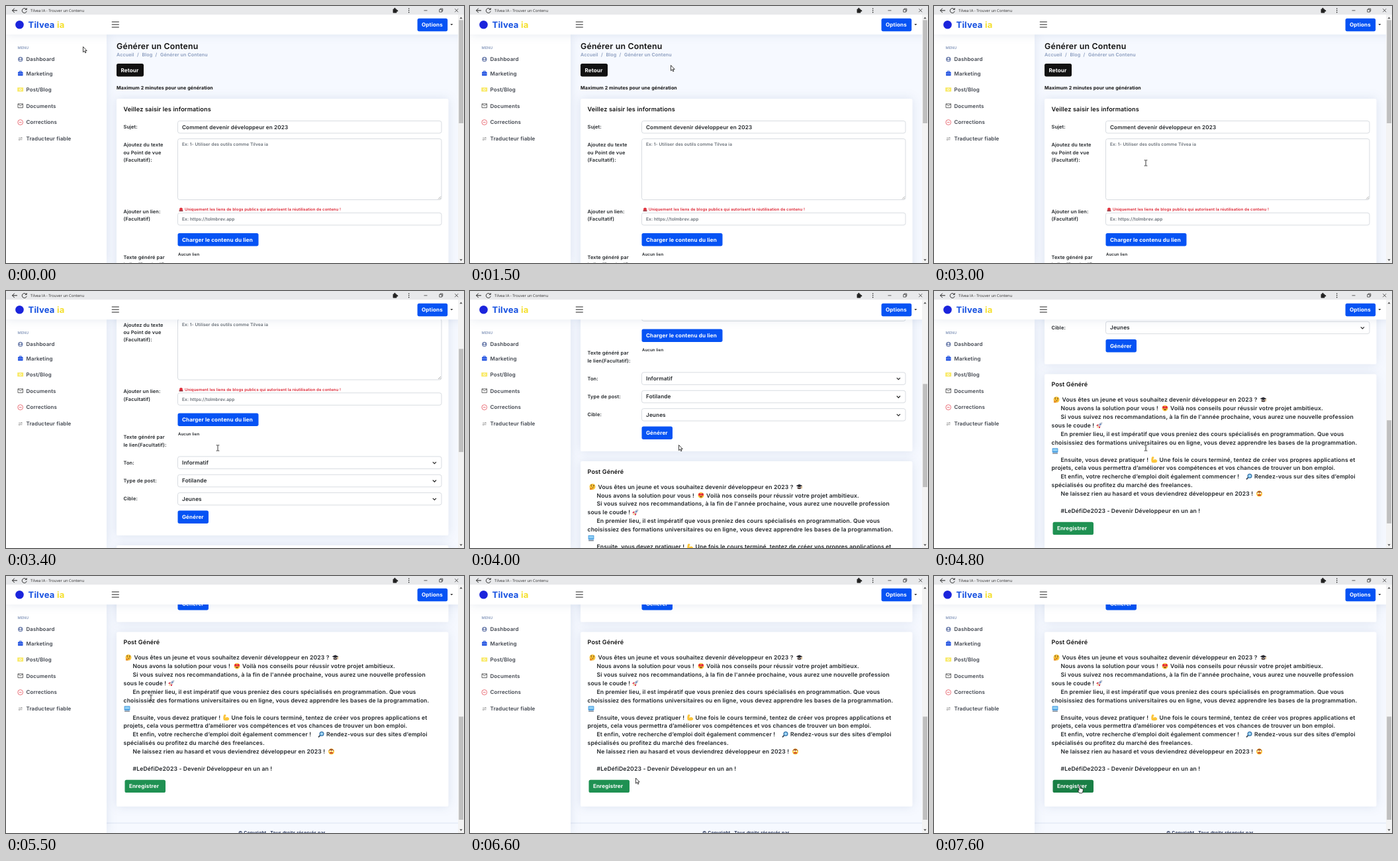
Write an HTML page that moves like this. It is 692 px wide and 388 px high and loops after 8 s.

```html
<!DOCTYPE html>
<html lang="fr">
<head>
<meta charset="utf-8">
<title>Trouver un Contenu</title>
<style>
  html, body { margin: 0; width: 100%; height: 100%; overflow: hidden; background: #f6f9ff; }
  svg { display: block; width: 692px; height: 388px; }
  text { font-family: Inter, "Open Sans", sans-serif; font-weight: 600; letter-spacing: .016em;
         text-rendering: geometricPrecision; white-space: pre; }
  .bold { font-weight: 700; }
  .system { font-family: "Open Sans", sans-serif; font-weight: 400; letter-spacing: 0; }
  .panel { fill: #fff; filter: drop-shadow(0 0 7.8px rgba(1, 41, 112, .1)); }
  .field { fill: #fff; stroke: #ced4da; stroke-width: .8; }
  .line { fill: none; stroke: #222; }
  .cursor { fill: #fff; stroke: #111; stroke-width: .8; stroke-linejoin: round; }
</style>
</head>
<body>
<svg id="stage" viewBox="0 0 692 388"></svg>
<script>
const INK = '#212529', BLUE = '#0653f4', GREEN = '#1f9152', DARK_GREEN = '#197f45', MUTED = '#899bbd', HINT = '#666d75';

// y is the vertical middle of the capitals
const text = (x, y, s, size, fill = INK, cls = '') =>
  `<text x="${x}" y="${y + size * .36}" font-size="${size}" fill="${fill}" class="${cls}">${s}</text>`;
const box = (x, y, w, h, fill, r = 0, extra = '') =>
  `<rect x="${x}" y="${y}" width="${w}" height="${h}" fill="${fill}" rx="${r}" ${extra}/>`;
const path = (d, width = 1, color = '#222') =>
  `<path class="line" d="${d}" stroke-width="${width}" style="stroke:${color}"/>`;
const shape = (d, fill) => `<path d="${d}" fill="${fill}"/>`;
const dot = (x, y, r, fill) => `<circle cx="${x}" cy="${y}" r="${r}" fill="${fill}"/>`;
const ring = (x, y, r, color, width, fill = 'none') =>
  `<circle cx="${x}" cy="${y}" r="${r}" fill="${fill}" stroke="${color}" stroke-width="${width}"/>`;
const button = (x, y, w, label, fill = BLUE, id = '') =>
  box(x, y, w, 19.4, fill, 2.6, id && `id="${id}"`) + text(x + 6.4, y + 9.6, label, 8.1, '#fff', 'bold');
const field = (y, h = 18.5) => box(259.5, y, 398.5, h, '#fff', 3, 'class="field"');
const select = (y, label, value) => text(177.5, y, label, 7.4) + field(y - 9.2) +
  text(266, y, value, 8.2) + path(`M644.8 ${y - 1}l2.6 2.6 2.6-2.6`, 1.1);
const labels = (y, ...lines) => lines.map((s, i) => text(177.5, y + i * 11.4, s, 7.4)).join('');

const face = dot(0, 0, 4.5, '#fbc53a');
const icons = {
  think: face + path('M-2.8-2.4l2-.6M1-2.2h2M-.5 1.6l2.2-.5', .8, '#5b3a16') + dot(-1.6, -.9, .7, '#5b3a16') +
    dot(1.8, -.9, .7, '#5b3a16') + shape('M-4 4.6q-.6-3 1.5-3.4l2 .8 1 1.2-2 1.6z', '#e8912a'),
  cap: shape('M-4.8-1.4L0-3.8l4.8 2.4L0 1z', '#2b2b33') + shape('M-2.8.4L0 1.8 2.8.4v2.4q-2.8 1.6-5.6 0z', '#45332f') +
    path('M3.8-1v3.6', .8, '#c98f2c'),
  love: face + dot(-2, -1.2, 1.9, '#e5233f') + dot(2, -1.2, 1.9, '#e5233f') + shape('M-2.4 1.4h4.8q-2.4 3.6-4.8 0z', '#6b2f15'),
  rocket: shape('M4.4-4.4q-4 0-6.4 4.4l2 2q4.4-2.4 4.4-6.4z', '#b9c3cf') +
    shape('M-1.4-1.4l-2.6.6-.6 2 2.6-.4zM1.4 1.4l-.6 2.6-2 .6.4-2.6z', '#d8304a') +
    shape('M-2 .8l-2.2 3.4 3.2-2z', '#f2a53a') + dot(1.4, -1.4, .9, '#3f6fc4'),
  screen: box(-4.4, -4.2, 8.8, 6.6, '#4d9fe0', .8) + box(-3.4, -3.2, 6.8, 3.6, '#8fd0f5') + box(-4, 3, 8, 1.5, '#7d8a99', .4),
  arm: shape('M-3.6-4.2h2.6l.6 2-1.2.6.2 2.4q3-2.6 5.4.4 1 2-1 3-4 1.2-7 .2-1.6-4 .4-8.6z', '#fbc53a'),
  lens: path('M-1.2 1.2l-2.8 2.8', 1.8, '#3b4654') + ring(1, -1, 2.9, '#2f70a8', 1.2, '#9fd6f7'),
  grin: face + shape('M-4.2-1.4q4.2-6 8.4 0z', '#a55a2a') + dot(-1.7, -.7, 1.1, '#fff') + dot(1.7, -.7, 1.1, '#fff') +
    box(-2.4, 1.2, 4.8, 1.8, '#c5302c', .9),
  siren: shape('M-2.4 1.4v-2q0-2 2.4-2t2.4 2v2z', '#e0303c') + box(-3, 1.4, 6, 1.5, '#8f2530', .3)
};
const icon = (name, x, y) => `<g transform="translate(${x} ${y})">${icons[name]}</g>`;

// row, then x and content pairs; a leading ":" names an icon
const post = [
  [0, 185, ':think', 193.5, 'Vous êtes un jeune et vous souhaitez devenir développeur en 2023 ?', 497.5, ':cap'],
  [1, 191.5, 'Nous avons la solution pour vous !', 349, ':love', 357, 'Voilà nos conseils pour réussir votre projet ambitieux.'],
  [2, 191.5, "Si vous suivez nos recommandations, à la fin de l'année prochaine, vous aurez une nouvelle profession"],
  [3, 177.5, 'sous le coude !', 250, ':rocket'],
  [4, 191.5, 'En premier lieu, il est impératif que vous preniez des cours spécialisés en programmation. Que vous'],
  [5, 177.5, 'choisissiez des formations universitaires ou en ligne, vous devez apprendre les bases de la programmation.'],
  [6, 183, ':screen'],
  [7, 191.5, 'Ensuite, vous devez pratiquer !', 333, ':arm', 340.5, 'Une fois le cours terminé, tentez de créer vos propres applications et'],
  [8, 177.5, 'projets, cela vous permettra d’améliorer vos compétences et vos chances de trouver un bon emploi.'],
  [9, 191.5, 'Et enfin, votre recherche d’emploi doit également commencer !', 476, ':lens', 484, 'Rendez-vous sur des sites d’emploi'],
  [10, 177.5, 'spécialisés ou profitez du marché des freelances.'],
  [11, 191.5, 'Ne laissez rien au hasard et vous deviendrez développeur en 2023 !', 491.5, ':grin'],
  [13, 191.5, '#LeDéfiDe2023 - Devenir Développeur en un an !']
];
const postRow = ([row, ...parts]) => {
  const y = 581 + row * 12.92;
  let out = '';
  for (let i = 0; i < parts.length; i += 2) {
    const [x, s] = [parts[i], parts[i + 1]];
    out += s[0] === ':' ? icon(s.slice(1), x, y) : text(x, y, s, 8.65);
  }
  return out;
};

const page =
  text(167, 60.5, 'Générer un Contenu', 12.3, '#111') +
  [[167, 'Accueil'], [198, '/'], [205.5, 'Blog'], [225.5, '/'], [233, 'Générer un Contenu']]
    .map(([x, s]) => text(x, 73.5, s, 7.15, MUTED)).join('') +
  button(167, 87, 41, 'Retour', '#111') +
  text(167, 123, 'Maximum 2 minutes pour une génération', 7.1, '#111', 'bold') +
  box(167, 140, 501.5, 387.5, '#fff', 2.6, 'class="panel"') +
  text(177.5, 156, 'Veillez saisir les informations', 9.1, '#111') +
  labels(182, 'Sujet:') + field(173.5) + text(266, 182.7, 'Comment devenir développeur en 2023', 8.15) +
  labels(209.5, 'Ajoutez du texte', 'ou Point de vue', '(Facultatif):') + field(200.5, 92) +
  text(266, 209, 'Ex: 1- Utiliser des outils comme Tilvea ia', 6.5, HINT) +
  path('M653 291.5l4-4M655.3 291.5l1.7-1.7', .6, '#777') +
  labels(310, 'Ajouter un lien:', '(Facultatif)') + icon('siren', 264.5, 307) +
  text(270, 307, 'Uniquement les liens de blogs publics qui autorisent la réutilisation de contenu !', 5.95, '#dc1f2e') +
  field(312.3) + text(266, 322, 'Ex: https://tolmbrev.app', 6.6, HINT) +
  button(259.5, 343, 122, 'Charger le contenu du lien') +
  labels(379, 'Texte généré par', 'le lien(Facultatif):') + text(260, 374.7, 'Aucun lien', 6.1) +
  select(417.6, 'Ton:', 'Informatif') + select(445, 'Type de post:', 'Fotilande') + select(472.3, 'Cible:', 'Jeunes') +
  button(259.5, 490, 46.5, 'Générer') +
  box(167, 542.5, 501.5, 263.5, '#fff', 2.6, 'class="panel"') +
  text(177.5, 558, 'Post Généré', 9, '#111') + post.map(postRow).join('') +
  button(179.5, 765.7, 61.5, 'Enregistrer', GREEN, 'save') +
  path('M152 831h532', .8, '#d5deef') +
  text(351, 846, '© Copyright . Tous droits réservés par', 6.9, '#16244a');

const menu = [[80.5, 'Dashboard'], [101.7, 'Marketing'], [126, 'Post/Blog'], [150.7, 'Documents'],
  [175.5, 'Corrections'], [200.5, 'Traducteur fiable']].map(([y, s]) => text(30.5, y, s, 7.95, '#41464f')).join('');

const sidebar = box(0, 43, 152, 345, '#fff', 0, 'class="panel"') + text(17.5, 63, 'MENU', 5.5, MUTED) + menu +
  dot(21.8, 80.5, 3.7, '#7484b0') + dot(21.8, 79.5, 1.3, '#fff') + shape('M19.4 83q2.4-3 4.8 0z', '#fff') +
  box(18, 99.6, 7.6, 5.6, '#1d4fe0', .8) + path('M20.3 99.6v-1.3h3v1.3', .9, '#1d4fe0') + path('M18 102.4h7.6', .5, '#fff') +
  box(17.2, 123, 9, 6.2, '#f9ea6a', .6) + ring(21.7, 126.1, 1.5, '#fff', .8) +
  path('M18 147.8h7.5v5.8h-7.5zl3.75 3 3.75-3', .8, '#444') +
  ring(21.7, 175.6, 3.9, '#e5505a', .8) + path('M19.7 175.6h4', .8, '#e5505a') +
  path('M19 199.3h5.5l-1.5-1.3M24.5 201.7h-5.5l1.5 1.3', .7, '#777');

const header = box(0, 13, 692, 30, '#fff', 0, 'class="panel"') + dot(20.5, 28.2, 6.3, '#1b24dc') +
  text(33.5, 28.3, 'Tilvea', 13, '#1550e0', 'bold') + text(77, 28.3, 'ia', 13, '#f4df2c', 'bold') +
  path('M159.8 24h11M159.8 28h11M159.8 32h11', 1.2) +
  button(621.6, 18.8, 45.6, 'Options') + shape('M671.3 27h4l-2 2.3z', '#333');

const titleBar = box(0, 0, 692, 13, '#e8e9eb') +
  path('M17 6.8H9.5M12.8 3.5L9.5 6.8l3.3 3.3') +
  path('M30.8 5.2a3.5 3.5 0 1 0 .4 2.6M31.2 3v2.4h-2.4', .9) +
  text(37, 6.8, 'Tilvea IA - Trouver un Contenu', 5.8, '#333', 'system') +
  box(584.6, 4.4, 5.8, 6, '#222', .7) + dot(587.4, 4, 1.2, '#222') + dot(591, 7.3, 1.2, '#222') +
  [4, 6.8, 9.6].map(y => dot(608.7, y, .8, '#222')).join('') +
  path('M631.5 6.8h5M654.8 5.3h3.8v3.8h-3.8zM656 5.2V4h3.8v3.8h-1.2M678.2 4.2l5 5M683.2 4.2l-5 5', .7);

const scrollbar = box(683, 13, 9, 375, '#f3f3f3') + shape('M685.4 19.2h4.2l-2.1-2.6z', '#555') +
  shape('M685.4 382.3h4.2l-2.1 2.6z', '#555') + box(684.2, 21.3, 6.8, 155.7, '#bfbfbf', 0, 'id="thumb"');

const cursors =
  '<path id="arrow" class="cursor" d="M-4.5-4.5v8.2l1.9-1.7 1.3 2.8 1.3-.6-1.3-2.7h2.5z"/>' +
  '<path id="beam" class="line" d="M-2.3-4.2h1.6l.7.6.7-.6h1.6M0-3.6v7.2M-2.3 4.2h1.6l.7-.6.7.6h1.6" stroke-width=".9"/>' +
  '<path id="hand" class="cursor" d="M-2 1V-5.2a1 1 0 0 1 2 0v3.7l3.5.8q1 .3.9 1.5l-.6 3.2-1 1.8h-4l-2.8-4q.6-1.2 2 .2z"/>';

document.getElementById('stage').innerHTML =
  box(0, 0, 692, 388, '#f6f9ff') + `<g id="page">${page}</g>` + sidebar + header + titleBar + scrollbar + cursors;

const scrollKeys = [[0, 0], [3000, 0], [3400, 158.5], [4000, 285.5], [4800, 417], [5200, 458]];
const pointerKeys = [
  [0, 121, 66, 'arrow'], [300, 380, 347, 'arrow'], [600, 578, 177, 'beam'], [700, 578, 177, 'beam'],
  [1100, 619.5, 216, 'beam'], [1400, 619.5, 216, 'beam'], [1500, 308, 94, 'arrow'], [1700, 308, 94, 'arrow'],
  [2300, 24, 176, 'arrow'], [2500, 24, 176, 'arrow'], [2800, 220, 218, 'arrow'], [3000, 320, 237, 'beam'],
  [3800, 320, 237, 'arrow'], [4300, 320, 237, 'beam'], [5200, 320, 237, 'beam'], [5500, 219, 184, 'beam'],
  [6100, 340, 247, 'arrow'], [6700, 238, 322, 'hand'], [6800, 235, 326, 'hand'], [7000, 235, 326, 'hand'],
  [7300, 217, 323, 'hand'], [7600, 221, 322, 'hand']
];

// current key with its numbers moved linearly towards the next one
function sample(keys, t) {
  const i = keys.findLastIndex(key => key[0] <= t);
  const from = keys[i], to = keys[i + 1] || from;
  const k = to === from ? 0 : (t - from[0]) / (to[0] - from[0]);
  return from.map((v, n) => typeof v === 'number' ? v + (to[n] - v) * k : v);
}

const el = id => document.getElementById(id);
const move = (id, x, y) => el(id).setAttribute('transform', `translate(${x} ${y})`);

function draw(now) {
  const t = Math.floor(now % 8000 / 100) * 100;
  const scroll = sample(scrollKeys, t)[1];
  const [, x, y, kind] = sample(pointerKeys, t);
  move('page', 0, -scroll);
  move('thumb', 0, scroll * .417);
  for (const id of ['arrow', 'beam', 'hand']) {
    el(id).style.display = id === kind ? '' : 'none';
    move(id, x, y);
  }
  el('save').setAttribute('fill', kind === 'hand' ? DARK_GREEN : GREEN);
  requestAnimationFrame(draw);
}
draw(0);
</script>
</body>
</html>
```
